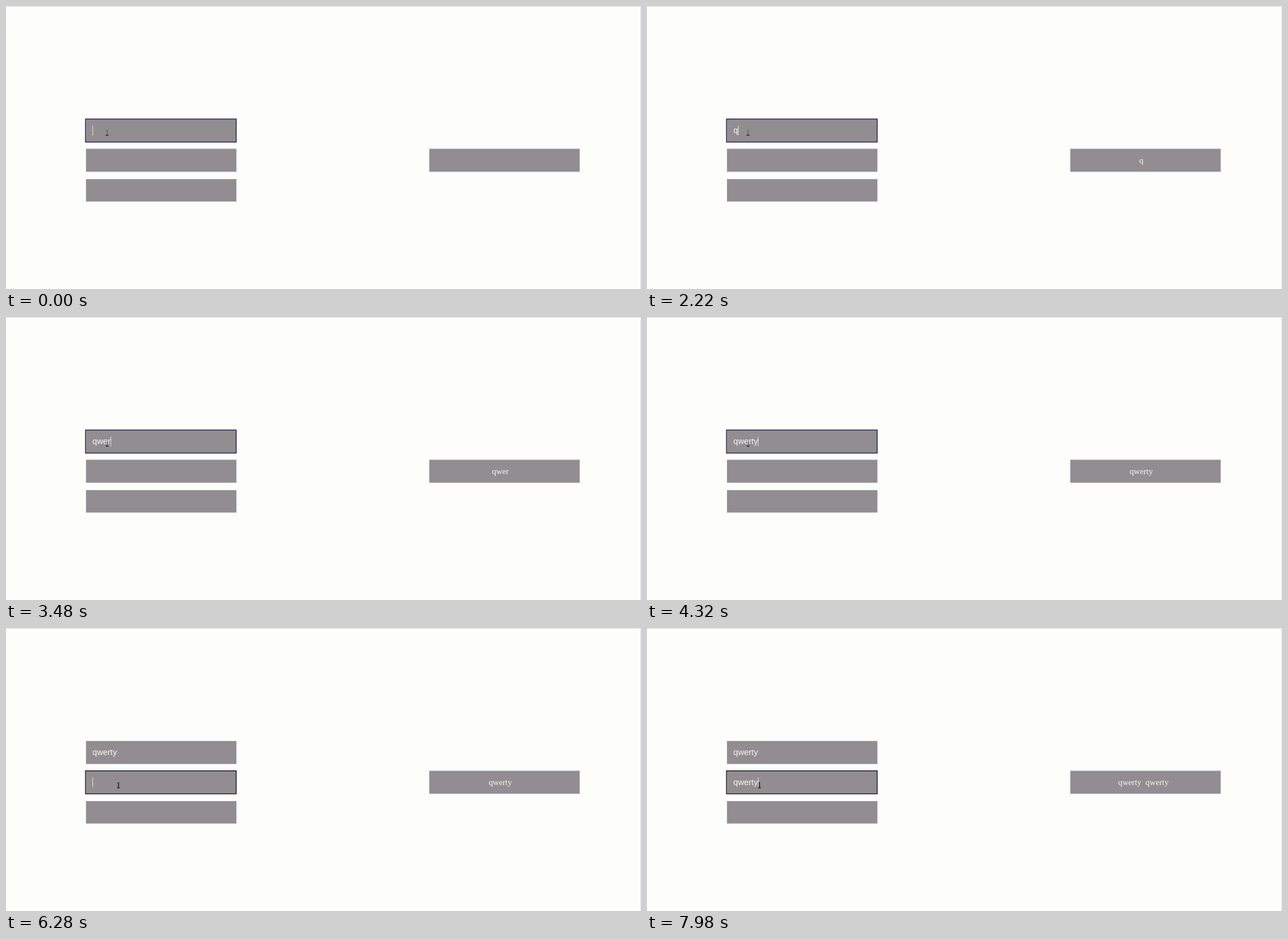
Animation, 1121 px wide and 499 px high, one loop 8 s. Source, as an HTML page with a canvas:

```html
<!DOCTYPE html>
<html lang="en">
<head>
<meta charset="utf-8">
<title>Linked input fields</title>
<style>
  html, body { margin: 0; width: 100%; height: 100%; overflow: hidden; background: #fdfdfc; }
  canvas { display: block; }
</style>
</head>
<body>
<canvas id="stage" width="1121" height="499"></canvas>
<script>
const ctx = document.getElementById('stage').getContext('2d');
const LOOP = 8000, WORD = 'qwerty';
const SANS = '14.7px "Liberation Sans", Arial, sans-serif';
const SERIF = '14.7px "Liberation Serif", "Times New Roman", serif';

// Time of each key press, per field
const keys = [
  [2080, 2620, 2960, 3300, 3660, 4000],
  [6660, 6860, 7060, 7280, 7500, 7700]
];
const CLICK = 6000, MOVE_START = 4960, MOVE_END = 5420;
const fieldTops = [199, 251.5, 305];

const typed = (field, t) => WORD.slice(0, (keys[field] || []).filter(k => k <= t).length);

function box(x, y, h = 41) {
  ctx.fillStyle = '#aaa7ae';
  ctx.fillRect(x, y, 266, h);
  ctx.fillStyle = '#918d91';
  ctx.fillRect(x + 1, y + 1, 264, h - 2);
}

function label(text, font, x, y) {
  ctx.font = font;
  ctx.fillStyle = '#f8f8f5';
  ctx.fillText(text, x, y);
}

function caret(field, t) {
  const start = field ? CLICK : -100;
  const last = Math.max(start, ...keys[field].filter(k => k <= t));
  if ((t - last) % 1000 >= 500) return;
  ctx.font = SANS;
  const x = 152.5 + ctx.measureText(typed(field, t)).width;
  ctx.fillStyle = '#dddcd2';
  ctx.fillRect(x, fieldTops[field] + 12, 1.2, 17);
}

function pointer(t) {
  const p = Math.min(1, Math.max(0, (t - MOVE_START) / (MOVE_END - MOVE_START)));
  const e = p * p * (3 - 2 * p);
  const x = 178.5 + 20 * e, y = 223.5 + 54 * e;
  ctx.fillStyle = '#24242c';
  ctx.globalAlpha = 0.35 + 0.65 * e;
  ctx.fillRect(x - 2, y - 5, 3, 1);
  ctx.fillRect(x - 0.8, y - 5, 1.7, 9);
  ctx.globalAlpha = 1;
  ctx.fillRect(x - 2.5, y + 3.5, 5, 1.5);
}

function draw(t) {
  ctx.fillStyle = '#fdfdfc';
  ctx.fillRect(0, 0, 1121, 499);
  ctx.fillStyle = '#d9d9dc';
  ctx.fillRect(0, 0, 1121, 1);
  ctx.fillStyle = '#dfdfe7';
  ctx.fillRect(1120, 0, 1, 499);

  const focus = t < CLICK ? 0 : 1;
  fieldTops.forEach((y, i) => {
    box(141, y, i === 2 ? 40 : 41);
    if (i === focus) {
      ctx.strokeStyle = i ? '#25252a' : '#2b2b4c';
      ctx.lineWidth = 1.6;
      ctx.strokeRect(140.4, y + 0.3, 266, 40.6);
    }
  });
  box(747, 251.5);
  pointer(t);

  const words = fieldTops.map((_, i) => typed(i, t));
  words.forEach((word, i) => label(word, SANS, 152.5, fieldTops[i] + 25));
  caret(focus, t);

  const joined = words.join('  ');
  ctx.font = SERIF;
  label(joined, SERIF, 880 - ctx.measureText(joined).width / 2, 276.5);
}

function tick() {
  draw(performance.now() % LOOP);
  requestAnimationFrame(tick);
}
tick();
</script>
</body>
</html>
```
